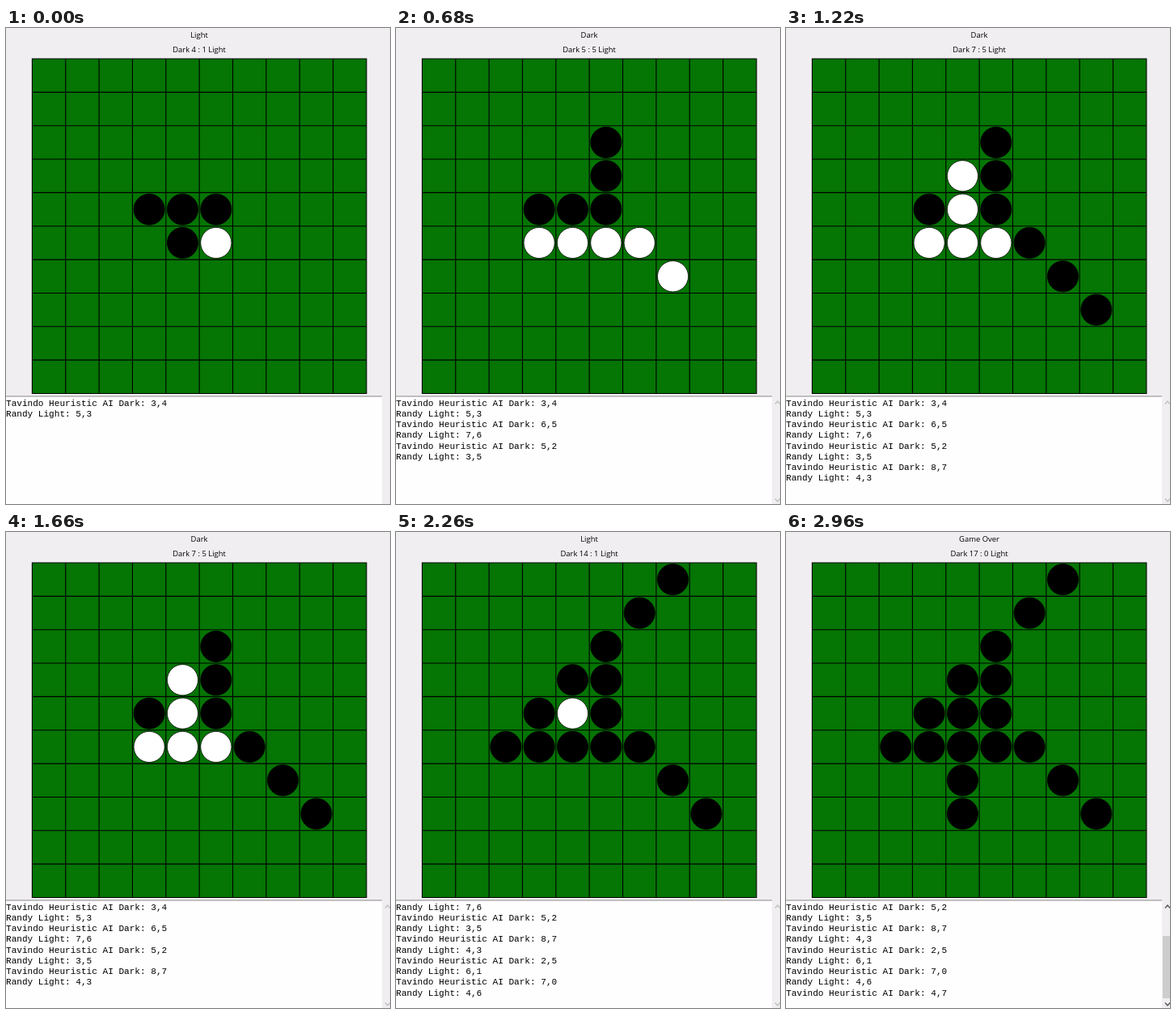
These frames come from a looping animation (475x588 px, 2.98 s). An HTML page:

```html
<!DOCTYPE html>
<html lang="en">
<head>
<meta charset="utf-8">
<title>Disc game</title>
<style>
  html, body { margin: 0; width: 100%; height: 100%; overflow: hidden; background: #f0eef1; }
  svg { display: block; width: 475px; height: 588px; }
  .label { font: 9.45px "Open Sans", "Noto Sans", sans-serif; text-anchor: middle; }
  .log { font: 11.07px "Liberation Mono", "Courier New", monospace; white-space: pre; }
</style>
</head>
<body>
<svg id="stage" viewBox="0 0 475 588"></svg>
<script>
const LOOP = 2980, SIZE = 10, CELL = 41.35, LEFT = 32.4, TOP = 38;
const LOG_ROWS = 9, LOG_BASELINE = 466.6, LOG_PITCH = 13.25;
const PLAYERS = { D: "Tavindo Heuristic AI Dark", L: "Randy Light" };

// Each move: the time it reaches the board, then its column and row.
const MOVES = [
  [0, 3, 4], [60, 5, 3], [280, 6, 5], [340, 7, 6], [580, 5, 2],
  [640, 3, 5], [1120, 8, 7], [1180, 4, 3], [1800, 2, 5], [1880, 6, 1],
  [2260, 7, 0], [2320, 4, 6], [2480, 4, 7]
];
const side = i => i % 2 ? "L" : "D";

const stage = document.getElementById("stage");
function add(tag, attrs, parent = stage) {
  const node = document.createElementNS("http://www.w3.org/2000/svg", tag);
  for (const name in attrs) node.setAttribute(name, attrs[name]);
  return parent.appendChild(node);
}

// Place a disc and flip every enclosed run.
function play(board, who, col, row) {
  const next = { ...board, [[col, row]]: who };
  for (let dx = -1; dx <= 1; dx++) for (let dy = -1; dy <= 1; dy++) {
    if (!dx && !dy) continue;
    const run = [];
    let x = col + dx, y = row + dy;
    while (board[[x, y]] && board[[x, y]] !== who) {
      run.push([x, y]);
      x += dx;
      y += dy;
    }
    if (board[[x, y]] === who) run.forEach(cell => next[cell] = who);
  }
  return next;
}

const boards = [{ "4,4": "L", "5,5": "L", "5,4": "D", "4,5": "D" }];
MOVES.forEach(([, col, row], i) => boards.push(play(boards[i], side(i), col, row)));
const messages = MOVES.map(([, col, row], i) => `${PLAYERS[side(i)]}: ${col},${row}`);

add("rect", { width: 475, height: 588, fill: "#f0eef1" });
const turn = add("text", { class: "label", x: 239, y: 12.3 });
const score = add("text", { class: "label", x: 239, y: 29.8 });

const span = CELL * SIZE;
add("rect", { x: LEFT, y: TOP, width: span, height: span, fill: "#057504" });
let grid = "";
for (let i = 0; i <= SIZE; i++) {
  grid += `M${LEFT + i * CELL} ${TOP}v${span}M${LEFT} ${TOP + i * CELL}h${span}`;
}
add("path", { d: grid, stroke: "#000", "stroke-width": 1.1, "stroke-linecap": "square", fill: "none" });
const discs = add("g", { stroke: "#000", "stroke-width": 0.8 });

add("rect", { y: 455, width: 465, height: 133, fill: "#fefefe" });
add("path", { d: "M0 455H465", stroke: "#888" });
const rows = Array.from({ length: LOG_ROWS }, (_, i) =>
  add("text", { class: "log", x: 0, y: LOG_BASELINE + i * LOG_PITCH }));

const thumb = add("rect", { x: 466, y: 499, width: 9, height: 77, fill: "#cdcdcd" });
const arrows = add("path", {
  d: "M469 464.5L472 461L475 464.5M469 581.5L472 585L475 581.5",
  fill: "none", "stroke-width": 1.3
});

let shown = -1;
function showState(count) {
  if (count === shown) return;
  shown = count;
  const board = boards[count], over = count === MOVES.length;
  const tally = who => Object.values(board).filter(v => v === who).length;
  turn.textContent = over ? "Game Over" : count % 2 ? "Light" : "Dark";
  score.textContent = `Dark ${tally("D")} : ${tally("L")} Light`;

  discs.replaceChildren();
  for (const key in board) {
    const [col, row] = key.split(",").map(Number);
    add("circle", {
      cx: LEFT + (col + 0.5) * CELL, cy: TOP + (row + 0.5) * CELL, r: 19.1,
      fill: board[key] === "D" ? "#000" : "#fff"
    }, discs);
  }

  // Light's reply is logged before it reaches the board.
  const visible = messages.slice(0, count + count % 2).slice(-LOG_ROWS);
  rows.forEach((row, i) => row.textContent = visible[i] || "");
  thumb.setAttribute("visibility", over ? "visible" : "hidden");
  arrows.setAttribute("visibility", count > 2 ? "visible" : "hidden");
  arrows.setAttribute("stroke", over ? "#505050" : "#bfbfbf");
}

const start = performance.now();
function frame() {
  const time = (performance.now() - start) % LOOP;
  showState(MOVES.filter(move => move[0] <= time).length);
  requestAnimationFrame(frame);
}
frame();
</script>
</body>
</html>
```
